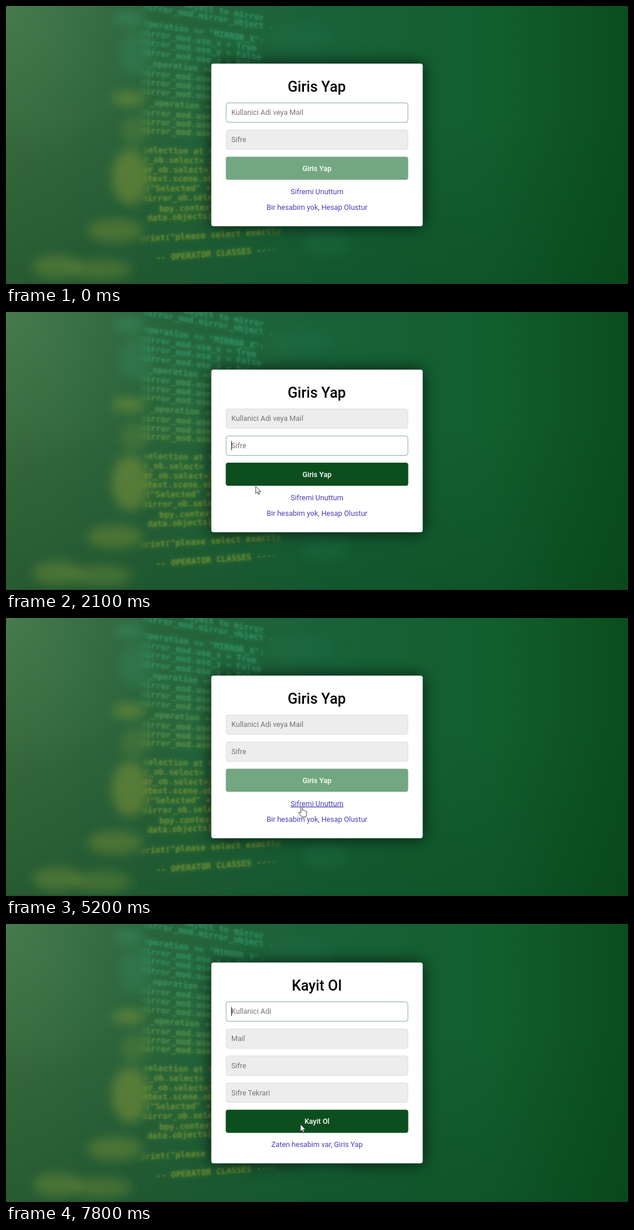
Recreate the animation shown at these times as an HTML page. Size 1071 by 480 pixels, loop 8000 ms.

```html
<!DOCTYPE html>
<html lang="tr">
<head>
<meta charset="utf-8">
<title>Giris Yap</title>
<style>
  html, body { margin: 0; width: 100%; height: 100%; overflow: hidden; background: #17603a; }
  svg { display: block; width: 1071px; height: 480px; font: 12.55px Roboto, sans-serif; }
  .code { font: bold 14.4px "DejaVu Sans Mono", monospace; white-space: pre; }
  .card { fill: #fff; filter: drop-shadow(0 0 14px rgba(0, 0, 0, .75)); }
  .title { font-size: 25.1px; font-weight: 500; }
  .mid { text-anchor: middle; }
  .field { fill: #ededed; stroke: #dcdcdc; }
  .focus .field { fill: #fff; stroke: #86aa9f; }
  .hint { fill: #757575; }
  .caret { fill: #111; }
  .link { fill: #4a3fb8; }
  .label { fill: #fff; font-weight: 500; }
  .pointer { fill: #fff; stroke: #3c3c44; stroke-linejoin: round; }
</style>
</head>
<body>
<svg viewBox="0 0 1071 480">
  <defs>
    <linearGradient id="base">
      <stop offset="0" stop-color="#38683d"/>
      <stop offset=".22" stop-color="#2a643b"/>
      <stop offset=".5" stop-color="#19623a"/>
      <stop offset=".78" stop-color="#125f2e"/>
      <stop offset="1" stop-color="#0b4d1c"/>
    </linearGradient>
    <radialGradient id="glow" gradientUnits="userSpaceOnUse" cx="0" cy="0" r="270">
      <stop stop-color="#64a672" stop-opacity=".3"/>
      <stop offset="1" stop-color="#64a672" stop-opacity="0"/>
    </radialGradient>
    <linearGradient id="dusk" x2="0" y2="1">
      <stop offset=".4" stop-color="#043c18" stop-opacity="0"/>
      <stop offset="1" stop-color="#043c18" stop-opacity=".3"/>
    </linearGradient>
    <linearGradient id="fade" gradientUnits="userSpaceOnUse" x1="232" x2="490" y1="0" y2="0">
      <stop stop-color="#000"/>
      <stop offset=".07" stop-color="#fff"/>
      <stop offset=".78" stop-color="#fff"/>
      <stop offset="1" stop-color="#000"/>
    </linearGradient>
    <mask id="sharp" maskUnits="userSpaceOnUse" x="0" y="-30" width="1071" height="540">
      <rect y="-30" width="1071" height="540" fill="url(#fade)"/>
    </mask>
  </defs>
  <rect width="1071" height="480" fill="url(#base)"/>
  <rect width="1071" height="480" fill="url(#glow)"/>
  <rect width="1071" height="480" fill="url(#dusk)"/>
  <g id="blobs" style="filter: blur(9px)"></g>
  <g id="haze" style="filter: blur(5px)" opacity=".45"></g>
  <g mask="url(#sharp)"><g id="code" style="filter: blur(.8px)" opacity=".62"></g></g>
  <rect y="478.8" width="1071" height="1.2" fill="#333" opacity=".45"/>
  <g id="login"></g>
  <g id="signup"></g>
  <path id="arrow" class="pointer" d="M0 0V12.2L2.9 9.6 4.8 14 6.7 13.2 4.9 8.9H8.8Z"/>
  <path id="hand" class="pointer" d="M-1 11V1.8a1.4 1.4 0 0 1 2.8 0V6.5q3-.6 3 .6q2.5-.5 2.6.8q1.6-.2 1.6 1.2V13l-1.5 5H.5L-4.4 11.4q-.8-2.2 1.2-1.6z"/>
</svg>
<script>
const $ = id => document.getElementById(id);

function add(parent, tag, attrs, text = '') {
  const el = document.createElementNS('http://www.w3.org/2000/svg', tag);
  for (const name in attrs) el.setAttribute(name, attrs[name]);
  el.textContent = text;
  return parent.appendChild(el);
}

// Background: blurred lights and a slanted listing
const lights = [
  [212, 160, 30, 13, '#7f9a3c', .5], [222, 215, 24, 24, '#7f9a3c', .25],
  [214, 295, 32, 48, '#86983a', .5], [188, 388, 48, 20, '#829438', .42],
  [88, 450, 42, 20, '#7b963c', .42], [165, 455, 52, 18, '#74923a', .4],
  [212, 22, 26, 12, '#3f9c76', .4], [225, 82, 30, 40, '#3f9670', .25],
  [550, 410, 40, 22, '#2a8a5c', .15], [505, 50, 60, 22, '#2a8a62', .12]
];
for (const [cx, cy, rx, ry, fill, opacity] of lights)
  add($('blobs'), 'ellipse', { cx, cy, rx, ry, fill, opacity });

const listing = [
  [228, -17, '# mirror object to mirror'], [236, 0, 'mirror_mod.mirror_object -'],
  [237, 29, 'operation == "MIRROR_X":'], [232, 45, 'mirror_mod.use_x = True'],
  [232, 61, 'mirror_mod.use_y = False'], [232, 78, 'mirror_mod.use_z = False'],
  [244, 98, '_operation == "MIRROR_Y"'], [232, 114, 'mirror_mod.use_x'],
  [232, 130, 'mirror_mod.use_y'], [232, 146, 'mirror_mod.use_z'],
  [247, 166, '_operation == "M'], [232, 183, 'mirror_mod.use_x'],
  [232, 199, 'mirror_mod.use_y'], [232, 214, 'mirror_mod.use_z'],
  [236, 248, 'selection at the'], [237, 265, 'r_ob.select= 1'],
  [236, 282, 'er_ob.select=1'], [235, 298, 'ntext.scene.ob'],
  [240, 315, '("Selected" + s'], [235, 332, 'mirror_ob.selec'],
  [264, 350, 'bpy.context.sel'], [243, 366, 'data.objects[on'],
  [231, 402, 'print("please select exactly'], [258, 435, '-- OPERATOR CLASSES ----']
];
for (const [x, y, text] of listing) {
  const warm = Math.min(1, Math.max(0, (y - 60) / 220));
  const fill = `rgb(${58 + 80 * warm},${164 - 2 * warm},${120 - 64 * warm})`;
  const transform = `matrix(1 ${(300 - y) * .00055} 0 1 ${x} ${y + 5})`;
  for (const layer of ['haze', 'code'])
    add($(layer), 'text', { class: 'code', transform, fill }, text);
}

// A card is a title, some fields, a button and links stacked downwards
function buildCard(root, top, title, hints, linkTexts) {
  const fieldY = i => top + 67.8 + i * 46.7;
  const buttonY = fieldY(hints.length) - .4;
  const linkY = i => buttonY + 64.4 + i * 27.5;
  const height = linkY(linkTexts.length - 1) + 28.1 - top;
  add(root, 'rect', { class: 'card', x: 353.5, y: top, width: 364, height, rx: 4 });
  add(root, 'text', { class: 'title mid', x: 535, y: top + 48.8 }, title);
  const fields = hints.map((hint, i) => {
    const y = fieldY(i), g = add(root, 'g', {});
    add(g, 'rect', { class: 'field', x: 379, y, width: 313, height: 33.6, rx: 4 });
    add(g, 'text', { class: 'hint', x: 388, y: y + 21 }, hint);
    const caret = add(g, 'rect', { class: 'caret', x: 388, y: y + 9, width: 1, height: 15.5 });
    return { g, caret };
  });
  const button = { x: 378.5, y: buttonY, width: 314, height: 39.6, rx: 4 };
  add(root, 'rect', { ...button, fill: '#73a781' });
  const hover = add(root, 'rect', { ...button, fill: '#0c4e1d' });
  add(root, 'text', { class: 'label mid', x: 535.5, y: buttonY + 24.4 }, title);
  const links = linkTexts.map((text, i) =>
    add(root, 'text', { class: 'link mid', x: 535.5, y: linkY(i) }, text));
  return { fields, hover, links };
}

const login = buildCard($('login'), 99.5, 'Giris Yap',
  ['Kullanici Adi veya Mail', 'Sifre'], ['Sifremi Unuttum', 'Bir hesabim yok, Hesap Olustur']);
const signup = buildCard($('signup'), 66.6, 'Kayit Ol',
  ['Kullanici Adi', 'Mail', 'Sifre', 'Sifre Tekrari'], ['Zaten hesabim var, Giris Yap']);

const route = [
  [1250, 449, 249], [1400, 441, 265], [1900, 433, 286], [2100, 430, 301], [2400, 412, 331],
  [3600, 412, 331], [4400, 506, 321], [4600, 509, 323.5], [5150, 509, 323.5], [5700, 507, 346]
];
const clamp = v => Math.min(1, Math.max(0, v));
const ramp = (t, start, end) => clamp((t - start) / (end - start));
const within = (t, ...spans) => spans.some(([from, to]) => t >= from && t < to);
const show = (el, on) => el.style.display = on ? '' : 'none';

function pointerAt(t) {
  const i = route.findIndex(p => p[0] > t);
  if (i < 0) return route.at(-1).slice(1);
  if (!i) return route[0].slice(1);
  const [a, b] = [route[i - 1], route[i]], k = ramp(t, a[0], b[0]);
  return [1, 2].map(n => a[n] + (b[n] - a[n]) * k);
}

function setFocus(fields, active, caretOn) {
  fields.forEach(({ g, caret }, i) => {
    g.setAttribute('class', i === active ? 'focus' : '');
    show(caret, i === active && caretOn);
  });
}

function draw() {
  const t = performance.now() % 8000, joined = t >= 7600;
  show($('login'), !joined);
  show($('signup'), joined);

  setFocus(login.fields, t < 600 ? 0 : t < 3700 ? 1 : -1,
    within(t, [100, 560], [600, 1050], [2050, 2580], [3110, 3640]));
  setFocus(signup.fields, 0, true);
  login.hover.style.opacity = ramp(t, 1420, 1720) - ramp(t, 2110, 2410);
  signup.hover.style.opacity = ramp(t, 7550, 7790);

  const [x, y] = pointerAt(t);
  const over = [
    !joined && x > 490 && x < 581 && y > 313 && y < 329,
    !joined && x > 449 && x < 622 && y > 339 && y < 356
  ];
  login.links.forEach((link, i) => link.style.textDecoration = over[i] ? 'underline' : 'none');
  const linked = over[0] || over[1];
  show($('hand'), linked);
  show($('arrow'), !linked && t >= 1250);
  for (const id of ['hand', 'arrow']) $(id).setAttribute('transform', `translate(${x} ${y})`);
  requestAnimationFrame(draw);
}
draw();
</script>
</body>
</html>
```
